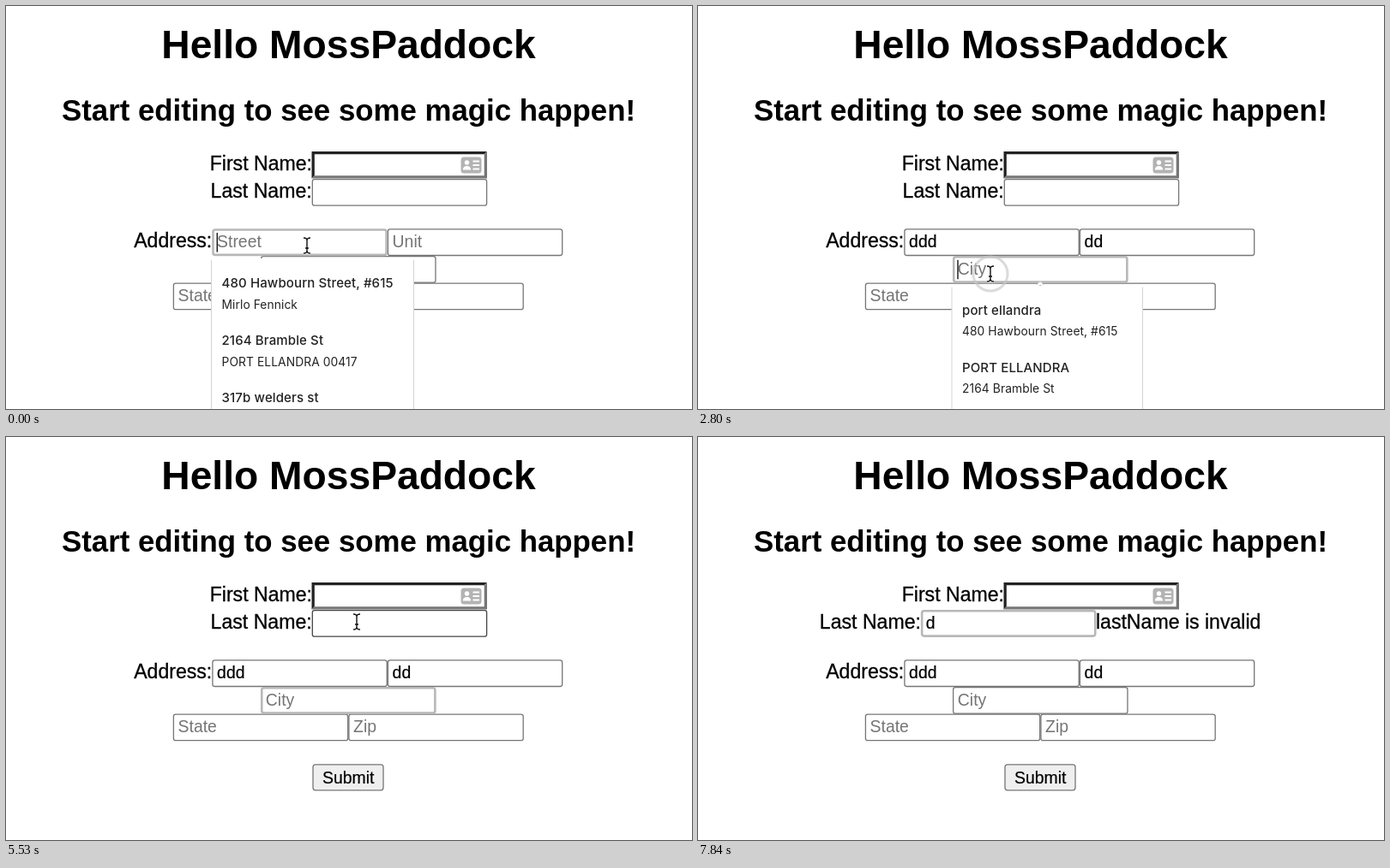
Write an HTML page that moves like this. It is 800 px wide and 471 px high and loops after 8000 ms.

```html
<!DOCTYPE html>
<html lang="en">
<head>
<meta charset="utf-8">
<title>Form validation</title>
<style>
  html, body { margin: 0; width: 100%; height: 100%; overflow: hidden; background: #fff; }
  svg { display: block; width: 100%; height: 100%; }
  text { font-family: "Liberation Sans", Arial, sans-serif; white-space: pre; }
  .h1 { font: bold 46.2px "Liberation Sans", Arial, sans-serif; text-anchor: middle; }
  .h2 { font: bold 34.8px "Liberation Sans", Arial, sans-serif; text-anchor: middle; }
  .label { font-size: 23.1px; stroke: #000; stroke-width: .3px; }
  .end { text-anchor: end; }
  .value { font-size: 19.4px; stroke: #000; stroke-width: .2px; }
  .hint { font-size: 19.4px; fill: #757575; }
  .pick { font: 500 15px Inter, Roboto, sans-serif; letter-spacing: .12px; fill: #222; }
  .sub { font: 13.8px Inter, Roboto, sans-serif; letter-spacing: .08px; fill: #222; }
</style>
</head>
<body>
<svg id="stage" viewBox="0 0 800 471"></svg>
<script>
const LOOP = 8000, MID = 399.3, BOX_W = 204.5, BOX_H = 31.8, CHAR_W = 10.8;
const stage = document.getElementById('stage');

// Each field: placeholder, width of its error message, and its value over time.
const fields = {
  lastName: { hint: '', msgW: 193.5, keys: [[6020, 'd'], [6580, 'dd'], [7000, 'ddd'], [7350, 'dd'], [7770, 'd']] },
  address1: { hint: 'Street', msgW: 191.4, keys: [[70, 'd'], [490, 'dd'], [770, 'ddd']] },
  address2: { hint: 'Unit', msgW: 191.4, keys: [[1820, 'd'], [2240, 'dd']] },
  city: { hint: 'City', msgW: 130.6, keys: [[3070, 'd'], [3780, 'dd'], [4620, 'd'], [5180, '']] },
  state: { hint: 'State', msgW: 0, keys: [] },
  zip: { hint: 'Zip', msgW: 0, keys: [] }
};
const rows = [
  { y: 202, label: 'Last Name:', labelW: 119.3, names: ['lastName'] },
  { y: 260.3, label: 'Address:', labelW: 91, names: ['address1', 'address2'] },
  { y: 292, names: ['city'] },
  { y: 323.5, names: ['state', 'zip'] }
];

const focusTimes = [[0, 'address1'], [1540, 'address2'], [2800, 'city'], [5740, 'lastName']];
const caretResets = [0, 70, 490, 770, 1540, 1820, 2240, 2800, 3070, 3780, 5740, 6020, 6580, 7000];
const clicks = [[1540, 554, 265], [2800, 341, 313], [5740, 409, 216]];

// Pointer visits: shown from, hidden at, then time/x/y stops.
const visits = [
  [0, 70, [[0, 351, 280]]],
  [1050, 1820, [[980, 351, 280], [1330, 554, 265]]],
  [2380, 3070, [[2310, 520, 262], [2520, 372, 331], [2660, 341, 313]]],
  [5180, 6020, [[5180, 341, 313], [5530, 409, 216]]]
];

const home = '480 Hawbourn Street, #615';
const town = 'PORT ELLANDRA';
const popups = [
  { from: 0, to: 70, x: 239.5, y: 295, w: 236, list: [
    [home, 'Mirlo Fennick'], ['2164 Bramble St', town + ' 00417'], ['317b welders st', town + ' 00417']] },
  { from: 1540, to: 1820, x: 444, y: 295, w: 222, list: [
    ['#615', home], ['#4', '2164 Bramble St'], ['2b', '317b welders st']] },
  { from: 2800, to: 3070, x: 296, y: 326.5, w: 222.5, nub: true, list: [
    [town.toLowerCase(), home], [town, '2164 Bramble St']] }
];

const latest = (list, t, start) => list.reduce((v, [at, next]) => t >= at ? next : v, start);
const text = (cls, x, y, s) => `<text class="${cls}" x="${x}" y="${y}">${s}</text>`;
const rect = (x, y, w, h, attrs) => `<rect x="${x}" y="${y}" width="${w}" height="${h}" ${attrs}/>`;
const smooth = p => p * p * (3 - 2 * p);

function pointerAt(t) {
  const visit = visits.find(([from, to]) => t >= from && t < to);
  if (!visit) return null;
  const stops = visit[2];
  const i = stops.findIndex(s => s[0] > t);
  if (i < 0) return stops[stops.length - 1].slice(1);
  const [t0, x0, y0] = stops[i - 1], [t1, x1, y1] = stops[i];
  const p = smooth((t - t0) / (t1 - t0));
  return [x0 + (x1 - x0) * p, y0 + (y1 - y0) * p];
}

function box(x, y, field, value, focused, pointer, caretOn) {
  const hover = pointer && pointer[0] > x && pointer[0] < x + BOX_W && pointer[1] > y && pointer[1] < y + BOX_H;
  let out = focused
    ? rect(x + 1.2, y + 1.2, BOX_W - 2.4, BOX_H - 2.4, 'rx="2.5" fill="#fff" stroke="#b8b8b8" stroke-width="2.6"')
    : rect(x + .6, y + .6, BOX_W - 1.2, BOX_H - 1.2, `rx="2.5" fill="#fff" stroke="${hover ? '#444' : '#767676'}" stroke-width="1.3"`);
  out += text(value ? 'value' : 'hint', x + 5.8, y + 21.8, value || field.hint);
  if (focused && caretOn) {
    out += rect(x + 5.3 + value.length * CHAR_W, y + 4.8, 1.3, 22.5, 'fill="#000"');
  }
  return out;
}

function form(t, pointer) {
  const focus = latest(focusTimes, t);
  const reset = caretResets.filter(at => at <= t).pop();
  const caretOn = Math.floor((t - reset) / 500) % 2 === 0;
  let out = '', top = '';
  for (const row of rows) {
    const cells = row.names.map(name => {
      const value = latest(fields[name].keys, t, '');
      return { name, value, msgW: value.length === 1 ? fields[name].msgW : 0 };
    });
    const labelW = row.labelW || 0;
    let x = MID - cells.reduce((w, c) => w + BOX_W + c.msgW, labelW) / 2 + labelW;
    if (row.label) out += text('label end', x, row.y + 22, row.label);
    for (const { name, value, msgW } of cells) {
      const focused = name === focus;
      const drawn = box(x, row.y, fields[name], value, focused, pointer, caretOn);
      if (focused) top += drawn; else out += drawn;
      x += BOX_W;
      if (msgW) out += text('label', x - .5, row.y + 22, name + ' is invalid');
      x += msgW;
    }
  }
  return out + top;
}

function popup(p, t) {
  const alpha = t < p.from ? 0 : t < p.to ? 1 : Math.max(0, 1 - (t - p.to) / 200);
  if (!alpha) return '';
  let out = rect(p.x, p.y, p.w, 200, 'rx="2" fill="#fff"') +
    `<path d="M${p.x} ${p.y + 2}v200m${p.w} 0v-200" fill="none" stroke="#d4d4d4"/>`;
  if (p.nub) out += '<path d="M395 326l3-3.5q1-1 2 0l3 3.5" fill="#fff" stroke="#d4d4d4"/>';
  p.list.forEach(([pick, sub], i) => {
    const y = p.y + 34 + i * 67;
    out += text('pick', p.x + 12, y, pick) + text('sub', p.x + 12, y + 24.5, sub);
  });
  return `<g opacity="${alpha}">${out}</g>`;
}

function ripple([at, x, y], t) {
  const p = (t - at) / 350;
  if (p < 0 || p > 1.2) return '';
  return `<circle cx="${x}" cy="${y}" r="${20 + 19 * p}" fill="none" stroke="#c8c8c8"
    stroke-width="${3 - 2 * Math.min(p, 1)}" opacity="${.65 - .2 * p}"/>`;
}

function ibeam([x, y]) {
  const d = 'M-4-9Q0-9 0-6Q0-9 4-9M0-6V6M-4 9Q0 9 0 6Q0 9 4 9M-2 3H2';
  return `<g transform="translate(${x} ${y})" fill="none">
    <path d="${d}" stroke="#fff" stroke-width="3"/><path d="${d}" stroke="#111" stroke-width="1.4"/></g>`;
}

const fixed =
  rect(0, 0, 800, 471, 'fill="#fff"') +
  text('h1', 399.5, 61, 'Hello MossPaddock') +
  text('h2', 399.5, 134, 'Start editing to see some magic happen!') +
  text('label end', 357, 192, 'First Name:') +
  // inset border
  '<path d="M356.5 201.5V170H561l-3.3 3.3H359.8V198.2Z" fill="#222225"/>' +
  '<path d="M561 170V201.5H356.5l3.3-3.3H557.7V173.3Z" fill="#767676"/>' +
  // contact card
  rect(530.5, 176.5, 24, 19, 'rx="3.5" fill="#b3b3b3"') +
  '<circle cx="537.5" cy="183" r="2.7" fill="#fff"/>' +
  '<path d="M532.8 191.5Q533 187 537.5 187T542.2 191.5Z" fill="#fff"/>' +
  '<path d="M544.5 181.5H552M544.5 186H552M544.5 190.5H552" stroke="#fff" stroke-width="2"/>' +
  rect(358, 382.8, 82, 30, 'rx="3" fill="#efefef" stroke="#767676" stroke-width="1.3"') +
  text('value', 369, 404.5, 'Submit');

function draw(t) {
  const pointer = pointerAt(t);
  stage.innerHTML = fixed + form(t, pointer) +
    popups.map(p => popup(p, t)).join('') +
    clicks.map(c => ripple(c, t)).join('') +
    (pointer ? ibeam(pointer) : '');
}

const began = performance.now();
function tick() {
  draw((performance.now() - began) % LOOP);
  requestAnimationFrame(tick);
}
tick();
</script>
</body>
</html>
```
